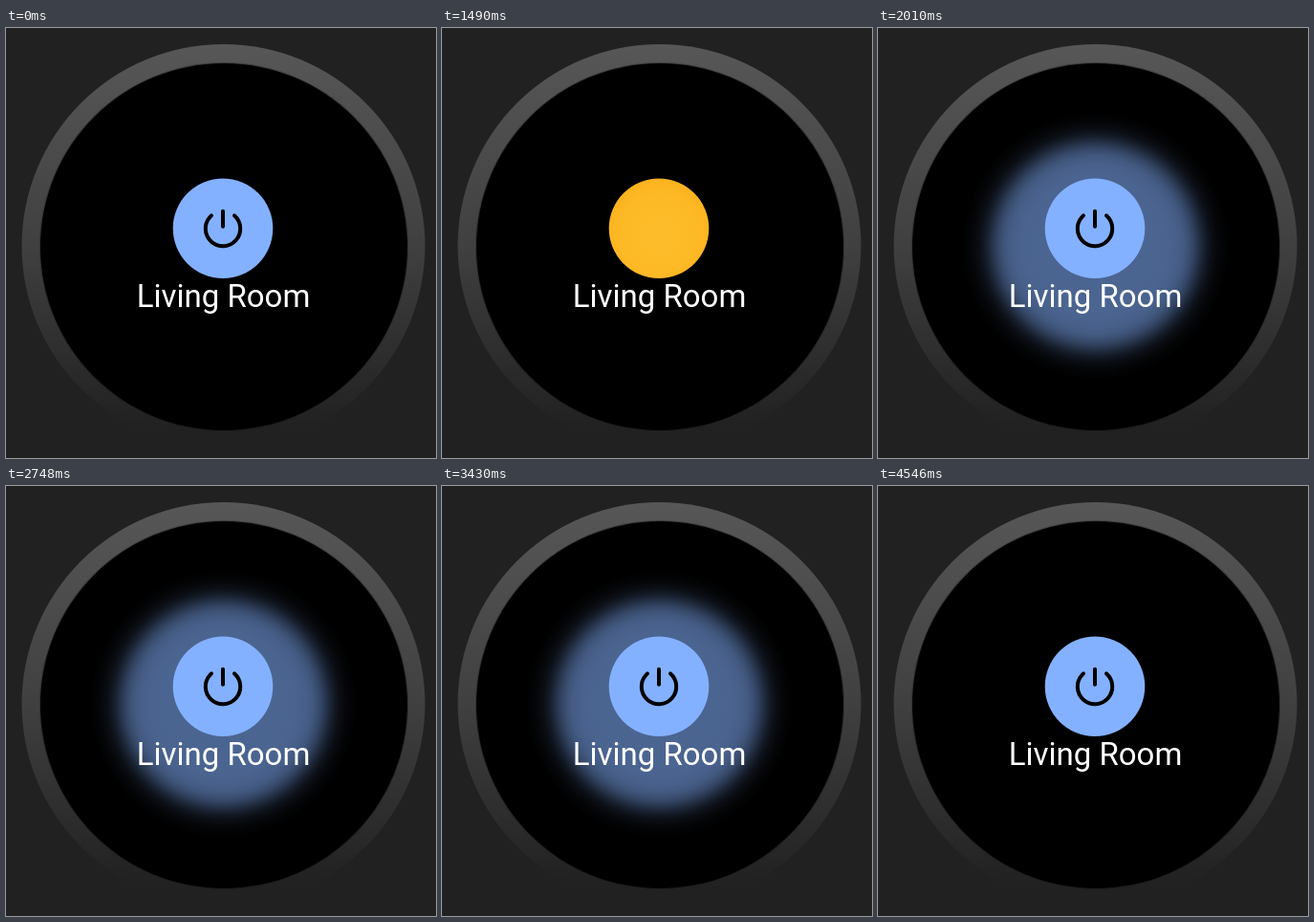
An HTML page with a canvas for the animation above (5.07 s loop, 450 by 450 pixels).

```html
<!DOCTYPE html>
<html lang="en">
<head>
<meta charset="utf-8">
<style>
  html, body { margin: 0; width: 100%; height: 100%; overflow: hidden; background: #212121; }
  canvas { display: block; }
</style>
</head>
<body>
<canvas id="stage" width="450" height="450"></canvas>
<script>
const ctx = document.getElementById('stage').getContext('2d');
const LOOP = 5070;
const button = { x: 227, y: 209.8, r: 52.3 };
const glow = { x: 227.5, y: 228, r: 108, sigma: 13, reach: 140 };

const within = (t, from, to) => t >= from && t < to;

function disc(x, y, r, fill) {
  ctx.fillStyle = fill;
  ctx.beginPath();
  ctx.arc(x, y, r, 0, Math.PI * 2);
  ctx.fill();
}

function drawBezel() {
  const shade = ctx.createLinearGradient(0, 17, 0, 439);
  shade.addColorStop(0, '#575757');
  shade.addColorStop(0.5, '#404040');
  shade.addColorStop(0.95, '#212121');
  shade.addColorStop(1, '#212121');
  disc(227.5, 228, 211, shade);
  disc(228, 229, 193, 'rgba(20,20,20,.4)');
  disc(228, 229, 192, '#000');
}

// Soft-edged disc: opacity follows a smooth S-curve around the radius.
function drawGlow() {
  const { x, y, r, sigma, reach } = glow;
  const fade = ctx.createRadialGradient(x, y, 0, x, y, reach);
  for (let i = 0; i <= 40; i++) {
    const d = (i / 40) * reach;
    const alpha = i === 40 ? 0 : 0.57 / (1 + Math.exp(1.702 * (d - r) / sigma));
    fade.addColorStop(i / 40, `rgba(132,177,255,${alpha})`);
  }
  disc(x, y, reach, fade);
}

function drawPowerIcon() {
  const { x, y } = button;
  const gap = 0.72;
  ctx.strokeStyle = '#000';
  ctx.lineWidth = 4;
  ctx.lineCap = 'round';
  ctx.beginPath();
  ctx.arc(x, y + 0.2, 18.2, -Math.PI / 2 + gap, Math.PI * 1.5 - gap);
  ctx.moveTo(x, y - 18);
  ctx.lineTo(x, y - 2);
  ctx.stroke();
}

function pressedFill() {
  const { x, y, r } = button;
  const fill = ctx.createRadialGradient(x, y + 8, 15, x, y + 4, r + 6);
  fill.addColorStop(0, '#fdbc29');
  fill.addColorStop(0.6, '#fdba26');
  fill.addColorStop(1, '#fdb11e');
  return fill;
}

function drawLabel() {
  ctx.font = '33px Roboto, sans-serif';
  ctx.textAlign = 'center';
  ctx.fillStyle = '#fff';
  ctx.fillText('Living Room', 227.5, 292);
}

function draw(t) {
  const pressed = within(t, 1490, 1600) || within(t, 3240, 3430);
  ctx.fillStyle = '#212121';
  ctx.fillRect(0, 0, 450, 450);
  drawBezel();
  if (within(t, 2010, 3760)) drawGlow();
  disc(button.x, button.y, button.r, pressed ? pressedFill() : '#84b1ff');
  if (!pressed) drawPowerIcon();
  drawLabel();
}

const start = performance.now();
function tick() {
  draw((performance.now() - start) % LOOP);
  requestAnimationFrame(tick);
}
tick();
</script>
</body>
</html>
```
